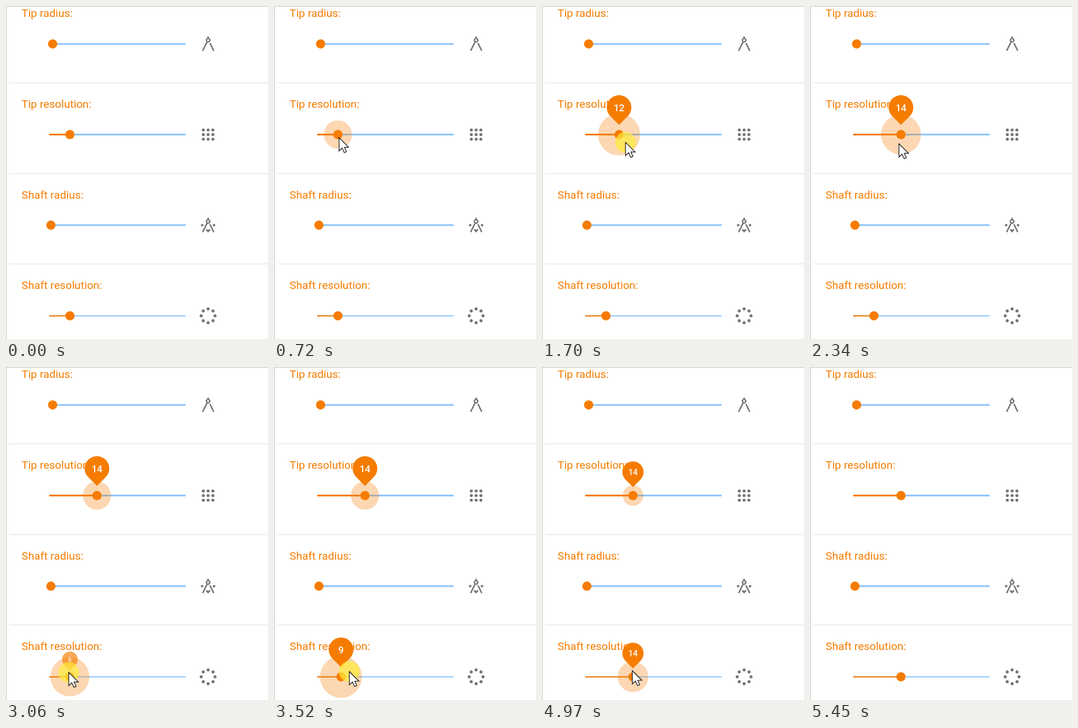
Recreate the animation shown at these times as an HTML page. Size 455 by 579 pixels, loop 6.13 s.

```html
<!DOCTYPE html>
<html lang="en">
<head>
<meta charset="utf-8">
<title>Slider panel</title>
<style>
  html, body { margin: 0; width: 100%; height: 100%; overflow: hidden; background: #fff; }
  svg { display: block; width: 455px; height: 579px; font-family: Roboto, sans-serif; }
  .label { font-size: 19.2px; fill: #f57c00; }
  .track { stroke: #8ec5fc; }
  .fill { stroke: #f57c00; }
  .knob, .pin path { fill: #f57c00; }
  .ripple { fill: #f57c00; opacity: .3; }
  .pin text { font-size: 16.5px; font-weight: 500; fill: #fff; text-anchor: middle; }
  .rule { stroke: #e0e0e0; }
  .icon { fill: #757575; }
  .leg { fill: none; stroke: #757575; stroke-width: 2.4; }
  #glow { fill: #ffeb3b; fill-opacity: .7; }
  #cursor { fill: #fff; stroke: #111; stroke-width: 1.2; }
</style>
</head>
<body>
<svg viewBox="0 0 455 579">
  <path d="M0 .5H455M.5 0V579" stroke="#c4c4c4"/>
  <g id="rows"></g>
  <g id="pins"></g>
  <circle id="glow" r="18"/>
  <path id="cursor" d="M0 0V23L5.3 18L9 26L12.8 24.4L9.4 16.7H16.6Z"/>
</svg>
<script>
const LOOP = 6130, ENTER = 100, CROSS = 2370, LEAVE = 4940;
const LEFT = 75, RIGHT = 312, UNIT = 5.93;
const LABEL_LEAD = 90, CURSOR_LEAD = 110;   // the knob trails the value and the pointer
const $ = id => document.getElementById(id);

function set(el, attrs) {
  for (const k in attrs) el.setAttribute(k, attrs[k]);
  return el;
}
function add(parent, tag, attrs, text = '') {
  const el = set(document.createElementNS('http://www.w3.org/2000/svg', tag), attrs);
  el.textContent = text;
  return parent.appendChild(el);
}

const easeOut = k => 1 - (1 - k) ** 3;
const smooth = k => k * k * (3 - 2 * k);
const ramp = (t, start, ms, ease = easeOut) => ease(Math.min(1, Math.max(0, (t - start) / ms)));
const lerp = (a, b, k) => a.map((v, i) => v + (b[i] - v) * k);
const bend = (a, c, b, k) => lerp(lerp(a, c, k), lerp(c, b, k), k);

// Icons, drawn around their centre
const dot = (g, cx, cy) => add(g, 'circle', { class: 'icon', cx, cy, r: 2.6 });

function compass(g) {
  add(g, 'circle', { class: 'leg', cy: -6.5, r: 3 });
  add(g, 'path', { class: 'leg', d: 'M0 -13V-9.5M-1.8 -3.5L-9.5 12M3.2 -1.5L9.8 12' });
}
function compassMarks(g) {
  compass(g);
  add(g, 'path', { class: 'icon', d: 'M-13 0l2.7-2.7l2.7 2.7l-2.7 2.7ZM7.6 0l2.7-2.7l2.7 2.7l-2.7 2.7ZM-4.2 8.5l2.1-2l2.1 2l2.1-2l2.1 2L0 13Z' });
}
function grid(g) {
  for (let i = 0; i < 9; i++) dot(g, (i % 3 - 1) * 8.3, (Math.floor(i / 3) - 1) * 8);
}
function ring(g) {
  for (let a = 0; a < 8; a++) dot(g, 12 * Math.cos(a * Math.PI / 4), 12 * Math.sin(a * Math.PI / 4));
}

function slider(row, name, x, icon, weight = 3) {
  const y = 65.9 + 157.6 * row, g = $('rows');
  add(g, 'text', { class: 'label', x: 27, y: Math.round(y - 46.5) }, name);
  add(g, 'path', { class: 'rule', d: `M6 ${Math.floor(y + 67.7) + .5}H455` });
  add(g, 'path', { class: 'track', d: `M${LEFT} ${y}H${RIGHT}`, 'stroke-width': weight });
  const fill = add(g, 'line', { class: 'fill', x1: LEFT, y1: y, x2: x, y2: y, 'stroke-width': weight });
  const ripple = add(g, 'circle', { class: 'ripple', cx: x, cy: y, r: 0 });
  const knob = add(g, 'circle', { class: 'knob', cx: x, cy: y, r: 8 });
  icon(add(g, 'g', { transform: `translate(351 ${y})` }));

  const pin = add($('pins'), 'g', { class: 'pin', opacity: 0 });
  add(pin, 'path', { d: 'M-15.1 15.1A21.4 21.4 0 1 1 15.1 15.1L0 30.2Z' });
  const value = add(pin, 'text', { y: 6 });

  return {
    x, y,
    ripple: r => set(ripple, { r }),
    move(x) {
      set(fill, { x2: x });
      set(knob, { cx: x });
      set(ripple, { cx: x });
    },
    pin(x, shown, n) {
      set(pin, {
        transform: `translate(${x} ${y - 20 - 27 * shown}) scale(${.4 + .6 * shown})`,
        opacity: Math.min(1, shown * 1.7)
      });
      value.textContent = n;
    }
  };
}

slider(0, 'Tip radius:', 81, compass);
const tip = slider(1, 'Tip resolution:', 111, grid);
const brushed = slider(2, 'Shaft radius:', 78, compassMarks);
const shaft = slider(3, 'Shaft resolution:', 111, ring, 2);

// One press and drag per slider: times in ms, pointer positions at both ends
const drags = [
  { on: tip, hover: 560, down: 720, up: 2310, relax: 2325, grab: [113, 229], drop: [154.5, 239.5],
    shift: t => 47 * ramp(t, 1430, 550, smooth) },
  { on: shaft, hover: 2800, down: 3000, up: 4660, relax: LEAVE, grab: [109, 531], drop: [155, 528],
    shift: t => 35 * ramp(t, 3440, 320, smooth) + 12 * ramp(t, 4060, 580, smooth) }
];

function pointer(t) {
  const [a, b] = drags;
  const held = d => lerp(d.grab, d.drop, d.shift(t + CURSOR_LEAD) / 47);
  if (t < a.down) return bend([388, 581], [130, 400], a.grab, ramp(t, ENTER, 590, smooth));
  if (t < CROSS) return held(a);
  if (t < b.down) return bend(a.drop, [28, 385], b.grab, ramp(t, CROSS, 580, smooth));
  if (t < LEAVE) return held(b);
  return bend(b.drop, [250, 530], [347, 582], ramp(t, LEAVE, 510, smooth));
}

function draw(t) {
  let pressed = 0;
  for (const d of drags) {
    const x = d.on.x + d.shift(t);
    const aim = d.on.x + d.shift(t + LABEL_LEAD);
    d.on.move(x);
    d.on.ripple(24.5 * (ramp(t, d.hover, 130) - ramp(t, LEAVE, 300))
      + 12 * (ramp(t, d.down, 150) - ramp(t, d.relax, 300)));
    d.on.pin(x, ramp(t, d.down, 400) - ramp(t, LEAVE, 360), Math.round((aim - LEFT) / UNIT));
    pressed += ramp(t, d.down, 30) - ramp(t, d.up, 30);
  }

  const [x, y] = pointer(t);
  const near = 1 - Math.hypot(x - brushed.x, y - brushed.y) / 30;
  brushed.ripple(t > CROSS ? 24 * Math.max(0, near) : 0);
  const transform = `translate(${x} ${y})`;
  set($('cursor'), { transform });
  set($('glow'), { transform, opacity: pressed });
}

let start;
function tick(now) {
  start ??= now;
  draw((now - start) % LOOP);
  requestAnimationFrame(tick);
}
draw(0);
requestAnimationFrame(tick);
</script>
</body>
</html>
```
